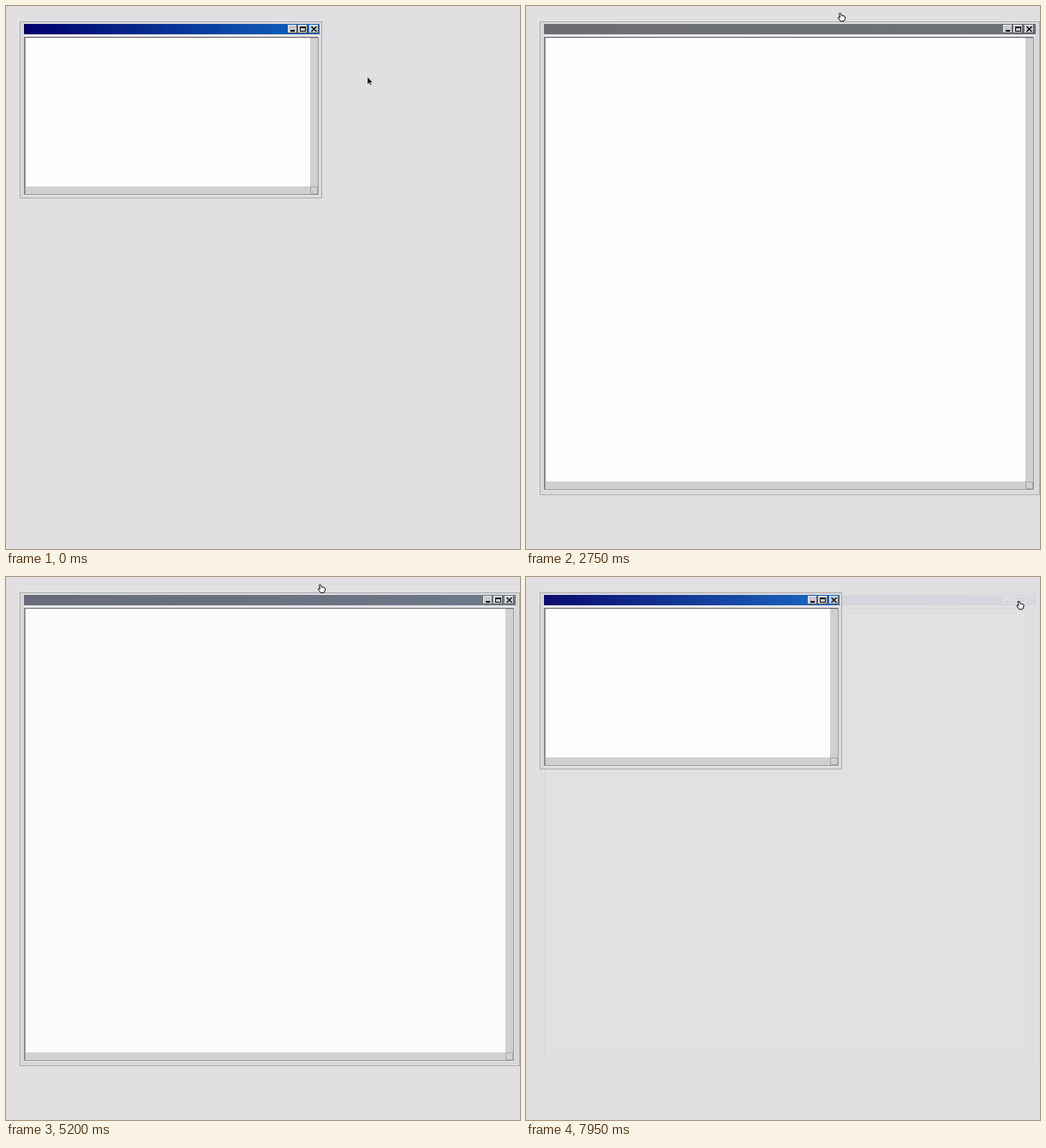
An HTML page that plays this animation: 600x635 px, repeating every 8000 ms.

```html
<!DOCTYPE html>
<html lang="en">
<head>
<meta charset="utf-8">
<title>Window</title>
<style>
html, body { margin: 0; width: 100%; height: 100%; overflow: hidden; background: #e1dfe2; }
svg { display: block; width: 600px; height: 635px; }
</style>
</head>
<body>
<svg viewBox="0 0 600 635">
  <defs>
    <linearGradient id="active"><stop stop-color="#00006b"/><stop offset="1" stop-color="#1066c2"/></linearGradient>
    <linearGradient id="idle"><stop stop-color="#6b6d72"/><stop offset="1" stop-color="#6d7277"/></linearGradient>
  </defs>
  <g id="large"></g>
  <g id="small"></g>
  <g id="cursor">
    <path id="arrow" d="M-2-5V3.4L0 1.7 1.2 4.5 2.5 4 1.3 1.2H3.8z" stroke="#fff" stroke-width=".4"/>
    <path id="hand" d="M-2.9-4.2q1-1 1.9 0L-.2-1.9 3.2-1.2 4.2 0 3.6 3 2.5 4.8H-1.4L-3.9.9-3.6-.1-1.9.3z"
      fill="#fff" stroke="#000" stroke-width=".95" stroke-linejoin="round"/>
  </g>
</svg>
<script>
const LOOP = 8000, FADE = 350;
const $ = id => document.getElementById(id);
const rect = (x1, y1, x2, y2, fill, extra = '') =>
  `<rect x="${x1}" y="${y1}" width="${x2 - x1}" height="${y2 - y1}" fill="${fill}" ${extra}/>`;
const outline = (x1, y1, x2, y2, color) =>
  rect(x1 + .5, y1 + .5, x2 - .5, y2 - .5, 'none', `stroke="${color}"`);
const layer = (name, body) => `<g class="${name}">${body}</g>`;

function button(x, icon) {
  return rect(x, 22, x + 11, 32, '#55565c') + rect(x, 22, x + 10, 31, '#eeeef0') +
    rect(x + 1, 23, x + 10, 31, '#c9c8ca') + `<g transform="translate(${x} 22)">${icon}</g>`;
}

function titleBar(right, buttonsRight, fill) {
  return rect(21, 21, right, 33, `url(#${fill})`) +
    button(buttonsRight - 37, rect(3, 6, 8, 8, '#000')) +
    button(buttonsRight - 25, outline(2, 2, 9, 8, '#111') + rect(2, 2, 9, 4, '#111')) +
    button(buttonsRight - 12, '<path d="M2.5 2l6 6m0-6l-6 6" stroke="#000" stroke-width="1.3"/>');
}

function frame(right, bottom) {
  return rect(16, 18, right, bottom, '#d8d7d9') + outline(16, 18, right, bottom, '#aaa9ab') +
    outline(17, 19, right - 1, bottom - 1, '#dfdee0');
}

// Sunken page with two empty scroll bars and a size box.
function page(right, bottom) {
  const x = right - 9, y = bottom - 9;
  return rect(20, 34, right + 2, 36, '#ecebed') +
    rect(21, 36, right + 1, bottom + 1, '#98979a') +
    rect(22, 37, right, bottom, '#d0cfd1') +
    rect(22, 36, right, 37.3, '#65646a') + rect(21, 36, 22.5, bottom, '#77767a') +
    rect(23, 37.3, x, y, '#fefdff') + outline(x, y, right, bottom, '#a5a4a6') +
    rect(21, bottom + 1, right + 2, bottom + 2, '#ecebed') +
    rect(right + 1, 36, right + 2, bottom + 2, '#e4e3e5');
}

const states = ['idle', 'active'];
$('small').innerHTML = frame(369, 225) + page(364, 220) +
  states.map(s => layer(s, titleBar(366, 366, s))).join('');
$('large').innerHTML = frame(600, 572) + rect(22, 36, 592, 565, '#e9e8ea') +
  states.map(s => layer(s, titleBar(595, 594, s) + page(592, 565))).join('');

// Cursor stops as [time, x, y]; in the middle it nods in and out of the title bar.
const nods = Array.from({ length: 6 }, (_, i) => [3500 + 414 * i, 368.5, i % 2 ? 30 : 13]);
const path = [[0, 424, 88], [700, 356, 30], [900, 352, 39], [1200, 355, 13], [1600, 348, 32],
  [2050, 348, 32], [2500, 368.5, 13], ...nods,
  [6000, 378, 23], [6450, 460, 13], [6900, 571, 22.5], [7200, 577, 33], [LOOP, 577, 33]];

const smooth = p => { p = Math.min(1, Math.max(0, p)); return p * p * (3 - 2 * p); };

function cursorAt(t) {
  const i = path.findIndex(k => k[0] > t);
  const [t0, x0, y0] = path[i - 1], [t1, x1, y1] = path[i];
  const p = smooth((t - t0) / (t1 - t0));
  return [x0 + (x1 - x0) * p, y0 + (y1 - y0) * p];
}

// The bar wakes when the cursor enters it and dims when the cursor leaves.
const fades = [{ start: -FADE, active: true }];
for (let t = 0, wasOver = false; t < LOOP; t += 5) {
  const [x, y] = cursorAt(t);
  const over = x < 595 && y >= 23 && y < 36;
  if (over !== wasOver && over !== fades.at(-1).active) fades.push({ start: t, active: over });
  wasOver = over;
}

function activeLevel(t) {
  const { start, active } = fades.findLast(f => f.start <= t);
  const p = smooth((t - start) / FADE);
  return active ? p : 1 - p;
}

function setOpacity(selector, value) {
  document.querySelectorAll(selector).forEach(el => el.setAttribute('opacity', value));
}

function draw(t) {
  const active = activeLevel(t);
  const grown = smooth((t - 1700) / FADE) - smooth((t - 7650) / FADE);
  setOpacity('.active', active);
  setOpacity('.idle', 1 - active);
  setOpacity('#small', 1 - grown);
  setOpacity('#large', grown);

  const [x, y] = cursorAt(t);
  const pressed = [3175, 7425].some(c => t >= c && t < c + 100);
  $('cursor').setAttribute('transform', `translate(${x} ${y}) scale(${pressed ? 1.15 : 1})`);
  const overWindow = x < 369 || t > 1000;
  setOpacity('#hand', +overWindow);
  setOpacity('#arrow', +!overWindow);
}

const begin = performance.now();
function tick() {
  draw((performance.now() - begin) % LOOP);
  requestAnimationFrame(tick);
}
tick();
</script>
</body>
</html>
```
